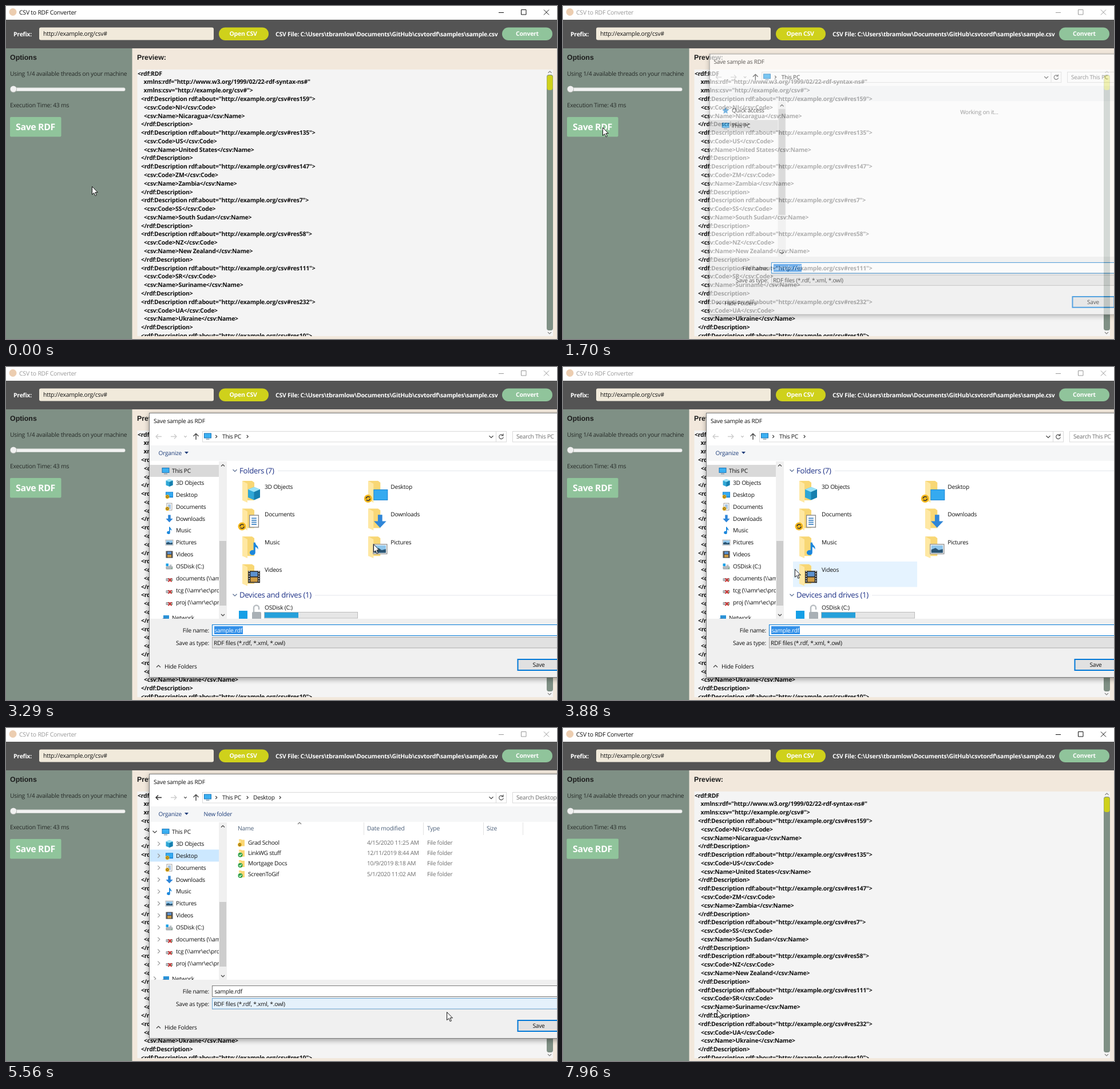
Recreate the animation shown at these times as an HTML page. Size 963 px wide and 582 px high, loop 7.99 s.

```html
<!DOCTYPE html>
<html lang="en">
<head>
<meta charset="utf-8">
<title>CSV to RDF Converter</title>
<style>
html, body { margin: 0; width: 100%; height: 100%; overflow: hidden; background: #f2e8dc; }
svg { display: block; }
text { font: 10.4px "Open Sans", "Noto Sans", sans-serif; letter-spacing: -.024em; text-rendering: geometricPrecision; fill: #111; white-space: pre; }
.app { font-size: 10.5px; }
.b { font-weight: 700; font-size: 10.5px; }
.w { fill: #fff; }
.mid { text-anchor: middle; }
.end { text-anchor: end; }
.head { font: 700 12.4px "Liberation Sans", Arial, sans-serif; letter-spacing: 0; fill: #1c1c1c; }
.big { font-size: 15.9px; }
.side { fill: #262b28; }
.group { font-size: 13.2px; fill: #1e3287; }
.gray { fill: #6d6d6d; }
.col { fill: #4c607a; }
.blue { fill: #1e3e7b; }
.dlg { font-size: 10.2px; }
#dialog { transform-origin: 624px 311px; }
</style>
</head>
<body>
<svg id="stage" width="963" height="582" viewBox="0 0 963 582"></svg>
<script>
const LOOP = 7990, css = [];

function track(frames, ease = 'linear') {
  const name = 'k' + css.length;
  const body = frames.map(([ms, rule]) => `${(ms / LOOP * 100).toFixed(3)}%{${rule}}`).join('');
  css.push(`@keyframes ${name}{${body}}`);
  return `animation:${name} ${LOOP}ms ${ease} infinite`;
}

// Shows its content only between two times
function during(from, to, body) {
  const frames = [[0, 'visibility:hidden'], [from, 'visibility:visible'], [to, 'visibility:hidden']];
  if (to >= LOOP) frames[2] = [LOOP, 'visibility:visible'];
  return `<g style="${track(frames, 'step-end')}">${body}</g>`;
}

const esc = s => s.replace(/&/g, '&amp;').replace(/</g, '&lt;');
const text = (x, y, s, cls = 'dlg') => `<text x="${x}" y="${y}" dy=".35em" class="${cls}">${esc(s)}</text>`;
const rect = (x, y, w, h, fill, more = '') => `<rect x="${x}" y="${y}" width="${w}" height="${h}" fill="${fill}" ${more}/>`;
const line = (d, color = '#666', width = 1) => `<path d="${d}" fill="none" stroke="${color}" stroke-width="${width}"/>`;
const fill = (d, color) => `<path d="${d}" fill="${color}"/>`;
const dot = (x, y, r, color) => `<circle cx="${x}" cy="${y}" r="${r}" fill="${color}"/>`;
const clip = (id, x, y, w, h, body) =>
  `<clipPath id="${id}">${rect(x, y, w, h, '#000')}</clipPath><g clip-path="url(#${id})">${body}</g>`;
const chevron = (x, y, dir, color = '#555', r = 3.5) => {
  const turn = { down: 0, left: 90, up: 180, right: 270 }[dir];
  return `<g transform="translate(${x} ${y}) rotate(${turn})">${line(`M${-r} ${-r / 2}L0 ${r / 2}L${r} ${-r / 2}`, color, 1.2)}</g>`;
};

// Icons are centred on 0,0 in a box of about 14 pixels
const sync = dot(-3.5, 3.5, 3.4, '#f3b71b') + line('M-5.3 4a2 2 0 0 1 3.5-1.5M-1.7 3.2a2 2 0 0 1-3.5 1.4', '#333', .9);
const yellow = fill('M-5-6h4l1 1h5v11h-10z', '#fbd774') + fill('M-5-4h3v10h-3z', '#ffe9a6');
const sheet = rect(-4.5, -6, 9, 12, '#fff', 'stroke="#8a8a8a" stroke-width=".8"') + line('M-2.5-3h5M-2.5-1h5M-2.5 1h5M-2.5 3h5', '#3b82c4', .9);
const disk = rect(-6, 0, 12, 5, '#9aa0a5', 'rx="1"') + rect(-5, 2, 10, 1, '#e2e4e6') + dot(4, 3.5, .8, '#44b04b');
const art = {
  star: fill('M0-6l1.7 3.9 4.3.4-3.2 2.9 1 4.3L0 3.2l-3.8 2.3 1-4.3L-6-1.7l4.3-.4z', '#3a94d8'),
  desktop: rect(-6.5, -5, 13, 10, '#1b86d6') + rect(-5.5, -4, 11, 7, '#35aaf0') + sync,
  down: fill('M-2.2-6.5h4.4V0h4L0 6.5-6.2 0h4z', '#2f86d8'),
  sheet,
  docs: sheet + sync,
  picture: rect(-6.5, -4.5, 13, 9, '#fff', 'stroke="#999" stroke-width=".8"') + rect(-5.5, -3.5, 11, 7, '#8fc6ec') + fill('M-5.5 3.5v-3l4-1.5 3 2 4-1v3.5z', '#2c5573'),
  mark: dot(0, 0, 5.5, '#8a4a43'),
  cloud: dot(0, 0, 6, '#0f6cbd'),
  zip: rect(-3.5, -6, 7, 12, '#fbd774') + rect(-3.5, 3, 7, 3, '#d9a928'),
  folder: yellow,
  done: yellow + dot(-2.5, 3, 4, '#2fa34a') + line('M-4.5 3l1.5 1.7 2.7-3.2', '#fff', 1.2),
  synced: yellow + sync,
  pc: rect(-6.5, -5.5, 13, 9, '#1673b8') + rect(-5.5, -4.5, 11, 7, '#3bb0f2') + rect(-3, 4.5, 6, 1.3, '#7890a0'),
  cube: fill('M0-6.5L6-4v8L0 6.5-6 4v-8z', '#2fa7d6') + fill('M0-6.5L6-4 0-1.5-6-4z', '#9be3f7') + fill('M0-1.5L6-4v8L0 6.5z', '#177fae'),
  music: fill('M-.5-6.5h1.8c0 3 3.6 3 2.6 7C3.6-1 2.5-2 1.3-2v5.5a2.8 2.5 0 1 1-1.8-2.3z', '#1b87dc'),
  video: rect(-6, -6, 12, 12, '#333') + rect(-3.5, -5, 7, 4.5, '#5b91cf') + rect(-3.5, .5, 7, 4.5, '#cf9c43') + line('M-4.8-6v12M4.8-6v12', '#ddd', 1).replace('/>', ' stroke-dasharray="1 1.4"/>'),
  drive: disk + rect(-6, -5, 4.5, 4.5, '#159fe6') + rect(0, -3, 4, 3, '#b9bec2'),
  lost: disk + line('M-2 0l6 6M4 0l-6 6', '#d12a2a', 1.8),
  net: rect(-4, -5, 10, 7, '#2b93d8') + fill('M-6.5 1l7-2-2 6z', '#4a79a8'),
};
const icon = (kind, x, y, size = 1) => `<g transform="translate(${x} ${y}) scale(${size})">${art[kind]}</g>`;

/* main window */
function titleBar(color) {
  return rect(0, 0, 963, 24, '#fff') + dot(12, 10.5, 6.5, '#eccdb0') + text(23, 11, 'CSV to RDF Converter', 'app').replace('<text', `<text style="fill:${color}"`)
    + line('M861 11.5h9M900.5 6.5h8.5v8.5h-8.5zM940 6.5l9 9M949 6.5l-9 9', color);
}

function rdfLines() {
  const rows = [[0, '<rdf:RDF'], [10.5, 'xmlns:rdf="http://www.w3.org/1999/02/22-rdf-syntax-ns#"'], [10.5, 'xmlns:csv="http://example.org/csv#">']];
  const data = ['159 NI Nicaragua', '135 US United States', '147 ZM Zambia', '7 SS South Sudan', '58 NZ New Zealand', '111 SR Suriname', '232 UA Ukraine', '10'];
  for (const entry of data) {
    const [id, code, ...name] = entry.split(' ');
    rows.push([6, `<rdf:Description rdf:about="http://example.org/csv#res${id}">`]);
    if (code) rows.push([11, `<csv:Code>${code}</csv:Code>`], [11, `<csv:Name>${name.join(' ')}</csv:Name>`], [6, '</rdf:Description>']);
  }
  return rows.map(([dx, s], i) => text(230 + dx, 118 + i * 14.78, s, 'b')).join('');
}

const button = (x, y, w, h, r, color) => rect(x, y, w, h, color, `rx="${r}"`);
const app = titleBar('#111') + during(1520, 6310, titleBar('#999'))
  + rect(0, 24, 963, 50, '#545454') + text(13, 49, 'Prefix:', 'b w')
  + rect(58, 37.5, 305, 22, '#f1eadb', 'rx="3"') + text(65, 48.5, 'http://example.org/csv#', 'app')
  + button(372, 37.5, 87, 22.5, 11.2, '#cfd11b') + text(414.5, 48.5, 'Open CSV', 'b w mid')
  + text(471, 49, 'CSV File: C:\\Users\\tbramlow\\Documents\\GitHub\\csvtordf\\samples\\sample.csv', 'b w')
  + button(867, 37.5, 88, 22.5, 11.2, '#90c49b') + text(911, 48.5, 'Convert', 'b w mid')
  + rect(0, 74, 220.5, 508, '#7f9085')
  + text(7, 90, 'Options', 'head') + text(7, 118, 'Using 1/4 available threads on your machine', 'side')
  + rect(10, 142.5, 198.5, 6.5, '#d2d5d2', 'rx="3"') + rect(10, 143.5, 198, 4.5, '#f3f3f3', 'rx="2"')
  + dot(13, 145.5, 6, '#a9aea9') + dot(13, 145, 5.3, '#f1f1f1')
  + text(7, 173, 'Execution Time: 43 ms', 'side')
  + button(7, 194, 89.5, 34.5, 2, '#90c49b') + during(7020, LOOP, button(6.5, 193.5, 90.5, 35, 2, '#90c49b'))
  + text(51.5, 211, 'Save RDF', 'b w big mid')
  + text(229, 90, 'Preview:', 'head')
  + rect(229.5, 111, 715.5, 466, '#f4f4f4') + clip('previewArea', 229, 111, 716, 466, rdfLines())
  + rect(945, 111, 11, 466, '#f4f4f4') + rect(945, 120, 11, 447, '#7f9085', 'rx="4"')
  + rect(945.5, 121, 10, 26, '#cfd11b', 'rx="4"') + chevron(950.5, 115.5, 'up', '#888', 3) + chevron(950, 571.5, 'down', '#888', 3);

/* dialog: navigation tree */
const selection = (y, color) => rect(251, y - 10.5, 121, 21, color);
function tree(rows, pitch, start) {
  return rows.map(([kind, name], i) => icon(kind, 285.5, start + i * pitch) + text(297, start + i * pitch, name)).join('');
}
const thumb = (y, h) => rect(373, y, 12, h, '#cdcdcd');
const PITCH = 20.87;

const treeLoading = selection(208, '#d9d9d9') + icon('star', 279, 181) + text(290, 181, 'Quick access')
  + icon('pc', 279, 208) + text(290, 208, 'This PC') + thumb(178, 188);

const pin = y => `<g transform="translate(364 ${y}) rotate(45)">${fill('M-2-4h4v4h1.5v1.2h-3V5h-1V1.2h-3V0H-2z', '#8a939b')}</g>`;
const quick = [['desktop', 'Desktop'], ['down', 'Downloads'], ['docs', 'Documents'], ['picture', 'Pictures'], ['mark', 'Docmirrelly Fo'],
  ['zip', 'linkwg'], ['done', 'HW'], ['done', 'Lecture Notes'], ['done', 'Paper_Critique'], ['done', 'samples']];
const treeQuick = icon('star', 279, 188) + text(290, 188.5, 'Quick access') + tree(quick, PITCH, 209.5)
  + rect(358, 284, 14, 18, '#fff') + [0, 1, 2, 3, 4, 5].map(i => pin(209.5 + i * PITCH)).join('')
  + icon('cloud', 279, 424.5) + text(290, 424.5, 'FarCrate - Velun C') + thumb(178, 188);

const places = [['cube', '3D Objects'], ['desktop', 'Desktop'], ['docs', 'Documents'], ['down', 'Downloads'], ['music', 'Music'], ['picture', 'Pictures'],
  ['video', 'Videos'], ['drive', 'OSDisk (C:)'], ['lost', 'documents (\\\\amr'], ['lost', 'tcg (\\\\amr\\ec\\proj'], ['lost', 'proj (\\\\amr\\ec\\proj']];
const treePlaces = during(2700, 4500, selection(181.5, '#d9d9d9'))
  + during(4350, 4500, selection(223, '#e5f3ff')) + during(4500, LOOP, selection(223, '#cce8ff'))
  + icon('pc', 279, 181.5) + text(290, 181.5, 'This PC') + tree(places, PITCH, 202.4)
  + icon('net', 279, 439) + text(290, 438.5, 'Network')
  + during(4050, LOOP, chevron(260, 181.5, 'down', '#444') + places.map((_, i) => chevron(267, 202.4 + i * PITCH, 'right', '#999')).join('') + chevron(260, 438, 'right', '#999'))
  + thumb(304, 113);

const nav = clip('treeArea', 251, 165, 135, 275, rect(372, 165, 14, 275, '#f0f0f0')
  + '<g clip-path="url(#treeText)">' + '</g>'
  + during(1600, 1900, treeLoading) + during(1900, 2700, treeQuick) + during(2700, LOOP, treePlaces)
  // covers labels that run under the scroll bar
  + rect(372, 165, 14, 275, '#f0f0f0') + during(1600, 2700, thumb(178, 188)) + during(2700, LOOP, thumb(304, 113))
  + chevron(379, 172, 'up', '#444', 3) + chevron(379, 433.5, 'down', '#444', 3)).replace('<g clip-path="url(#treeText)"></g>', '');

/* dialog: file list */
const groupHead = (y, name, from) => chevron(400, y, 'down', '#5b6f93') + text(408, y, name, 'group') + line(`M${from} ${y + .5}H990`, '#e2e6ec');
const cell = (i, cols) => [452 + i % cols * 220.3, 209 + Math.floor(i / cols) * 48.6];

function blankFiles() {
  const names = ['3D Objects', 'Desktop', 'Documents', 'Downloads', 'Music', 'Pictures', 'Videos'];
  return groupHead(181, 'Folders (7)', 475) + names.map((name, i) => {
    const [x, y] = cell(i, 3);
    return `<path d="M${x - 39.5} ${y - 10.5}h20l8 8v28h-28z" fill="#f7f7f7" stroke="#8c8c8c"/>`
      + line(`M${x - 19.5} ${y - 10.5}v8h8`, '#8c8c8c') + text(x, y, name);
  }).join('');
}

function bigFolders() {
  const items = [['cube', '3D Objects'], ['pc', 'Desktop'], ['sheet', 'Documents'], ['down', 'Downloads'], ['music', 'Music'], ['picture', 'Pictures'], ['video', 'Videos']];
  const list = items.map(([kind, name], i) => {
    const [x, y] = cell(i, 2);
    const badge = i === 1 || i === 2 ? dot(x - 39.5, y + 21, 7, '#f3b71b') + line(`M${x - 43} ${y + 21}a3.6 3.6 0 0 1 6.5-2M${x - 36} ${y + 21}a3.6 3.6 0 0 1-6.5 2`, '#333', 1.5) : '';
    return fill(`M${x - 39} ${y - 10}h17l4 3v31h-21z`, '#f8d775') + fill(`M${x - 39} ${y - 10}l9 5v33l-9-4z`, '#ffe8a3')
      + (i === 1 ? rect(x - 30, y + 5, 25, 19, '#1b86d6') + rect(x - 29, y + 6, 23, 17, '#35aaf0') : icon(kind, x - 18.5, y + 12, i === 5 ? 1.85 : 1.75))
      + badge + text(x, y, name);
  }).join('');
  return groupHead(181, 'Folders (7)', 475) + during(3780, 3990, rect(402, 340, 217, 44.5, '#e5f3ff')) + list
    + groupHead(398.5, 'Devices and drives (1)', 540) + text(452, 420.5, 'OSDisk (C:)')
    + rect(407, 426, 15, 15, '#159fe6') + rect(430, 428, 16, 13, '#a9b0b5', 'rx="2"')
    + line('M433 428v-7a4.5 4.5 0 0 1 9 0v3', '#b9bec2', 2.5)
    + rect(451.5, 428.5, 163, 10.5, '#e6e6e6', 'stroke="#bcbcbc"') + rect(452, 429, 59, 9.5, '#26a0da');
}

function desktopFiles() {
  const heads = [[405, 'Name'], [631, 'Date modified'], [736, 'Type'], [840, 'Size']];
  const files = [['synced', 'Grad School', '4/15/2020 11:25 AM'], ['done', 'LinkWG stuff', '12/11/2019 8:44 AM'],
    ['done', 'Mortgage Docs', '10/9/2019 8:18 AM'], ['done', 'ScreenToGif', '5/1/2020 11:02 AM']];
  return heads.map(([x, name]) => text(x, 175.5, name, 'col')).join('')
    + line('M625.5 165v22M729.5 165v22M834.5 165v22M903.5 165v22', '#e2e2e2') + chevron(513, 166.5, 'up', '#777', 3)
    + files.map(([kind, name, date], i) => {
      const y = 200.5 + i * 18.2;
      return icon(kind, 412, y) + text(423, y, name) + text(631, y, date, 'dlg gray') + text(736, y, 'File folder', 'dlg gray');
    }).join('');
}

const pane = clip('paneArea', 387, 164, 612, 276,
  during(1600, 1900, text(729, 183.5, 'Working on it...', 'dlg gray mid'))
  + during(1900, 2700, blankFiles()) + during(2700, 4760, bigFolders()) + during(4760, LOOP, desktopFiles()));

/* dialog: frame, address row and lower part */
const arrow = (x, dir, color) => line(`M${x - 5} 121.5h10` + (dir < 0 ? `M${x - 1} 117.5l-4 4 4 4` : `M${x + 1} 117.5l4 4-4 4`), color, 1.3);
const address = arrow(267, -1, '#ccc') + arrow(293, 1, '#ccc') + chevron(313.5, 121.5, 'down', '#bbb', 2.2)
  + line('M332 127v-10M327.5 121l4.5-4.5 4.5 4.5', '#444', 1.4)
  + rect(343.5, 112.5, 531, 18.5, '#fff', 'stroke="#d9d9d9"') + line('M856.5 112.5V131', '#d9d9d9')
  + icon('pc', 352.5, 121) + chevron(367.5, 121.5, 'right', '#444', 2.5) + text(378, 121.5, 'This PC')
  + chevron(848, 122, 'down', '#444') + line('M868.5 119.5a3.8 3.8 0 1 0 .8 3M869 116.5v3.3h-3.3', '#555', 1.2)
  + rect(885.5, 112.5, 104, 18.5, '#fff', 'stroke="#d9d9d9"')
  + during(1600, 4760, text(892, 121.5, 'Search This PC', 'dlg gray'))
  + during(2700, LOOP, chevron(422, 121.5, 'right', '#444', 2.5))
  + during(4760, LOOP, arrow(267, -1, '#333') + chevron(313.5, 121.5, 'down', '#555', 2.2) + text(432, 121.5, 'Desktop')
    + chevron(479, 121.5, 'right', '#444', 2.5) + text(892, 121.5, 'Search Desktop', 'dlg gray'))
  + rect(251, 137, 747, 27, '#f5f6f7')
  + during(1900, LOOP, text(266.5, 150.5, 'Organize', 'dlg blue') + fill('M312 148h7l-3.5 4z', '#1e3e7b'))
  + during(4760, LOOP, text(345.5, 150.5, 'New folder', 'dlg blue'));

const picked = rect(360.5, 450.5, 630, 19, 'none', 'stroke="#0078d7"') + rect(364, 453, 50, 14, '#3390e8') + text(364.5, 460, 'sample.rdf', 'dlg w');
const lower = rect(251, 440, 747, 102, '#f0f0f0')
  + text(355, 460.5, 'File name:', 'dlg end') + rect(360.5, 450.5, 630, 19, '#fff', 'stroke="#7a7a7a"') + text(364.5, 460, 'sample.rdf')
  + during(1600, 4500, picked) + during(6200, LOOP, picked)
  + text(355, 482.5, 'Save as type:', 'dlg end') + rect(360.5, 472.5, 630, 18.5, '#e1e1e1', 'stroke="#adadad"')
  + during(5460, 5700, rect(360.5, 472.5, 630, 18.5, '#e5f1fb', 'stroke="#6ea9d8"')) + text(363, 482, 'RDF files (*.rdf, *.xml, *.owl)')
  + chevron(266.5, 523, 'up', '#444') + text(277, 523, 'Hide Folders')
  + rect(894.5, 511, 74, 19, '#e1e1e1', 'stroke="#0078d7" stroke-width="2"')
  + during(5950, LOOP, rect(894.5, 511, 74, 19, '#d8eaf9', 'stroke="#0078d7" stroke-width="2"')) + text(931, 520.5, 'Save', 'dlg mid');

const pose = (ms, opacity, scale) => [ms, `opacity:${opacity};transform:scale(${scale})`];
const dialogMove = track([pose(0, 0, .95), pose(1600, 0, .95), pose(1700, .66, .985), pose(1800, 1, 1),
  pose(6300, 1, 1), pose(6360, .16, .967), pose(6420, 0, .95), pose(LOOP, 0, .95)]);
const dialog = `<g id="dialog" style="${dialogMove}">`
  + rect(250.5, 80.5, 748, 462, '#fff', 'stroke="#777" filter="url(#shade)"')
  + text(258, 94, 'Save sample as RDF') + address + nav + pane + lower + '</g>';

/* pointer */
const stops = [[0, 150, 315], [540, 150, 315], [850, 112, 268], [1180, 69, 212], [2170, 69, 212], [2400, 811, 232],
  [2960, 800, 262], [3400, 590, 325], [3800, 405, 353], [3880, 405, 353], [4400, 318, 221], [4820, 318, 221], [5300, 650, 420],
  [5510, 765, 488], [5560, 770, 496], [5650, 778, 500], [6100, 921, 520], [6380, 921, 520], [6840, 637, 380], [7700, 637, 380], [7960, 269, 492], [LOOP, 269, 492]];
const pointerMove = track(stops.map(([ms, x, y]) => [ms, `transform:translate(${x}px,${y}px)`]));
const pointer = `<path style="${pointerMove}" d="M.5.5v14l3.2-3 2.4 5.2 2.2-1-2.4-5h4.4z" fill="#fff" stroke="#111"/>`;

document.getElementById('stage').innerHTML =
  '<defs><filter id="shade" x="-5%" y="-5%" width="110%" height="112%"><feDropShadow dx="0" dy="3" stdDeviation="5" flood-opacity=".35"/></filter></defs>'
  + rect(0, 0, 963, 582, '#f2e8dc') + app + dialog + pointer;
const style = document.createElement('style');
style.textContent = css.join('\n');
document.head.append(style);
</script>
</body>
</html>
```
